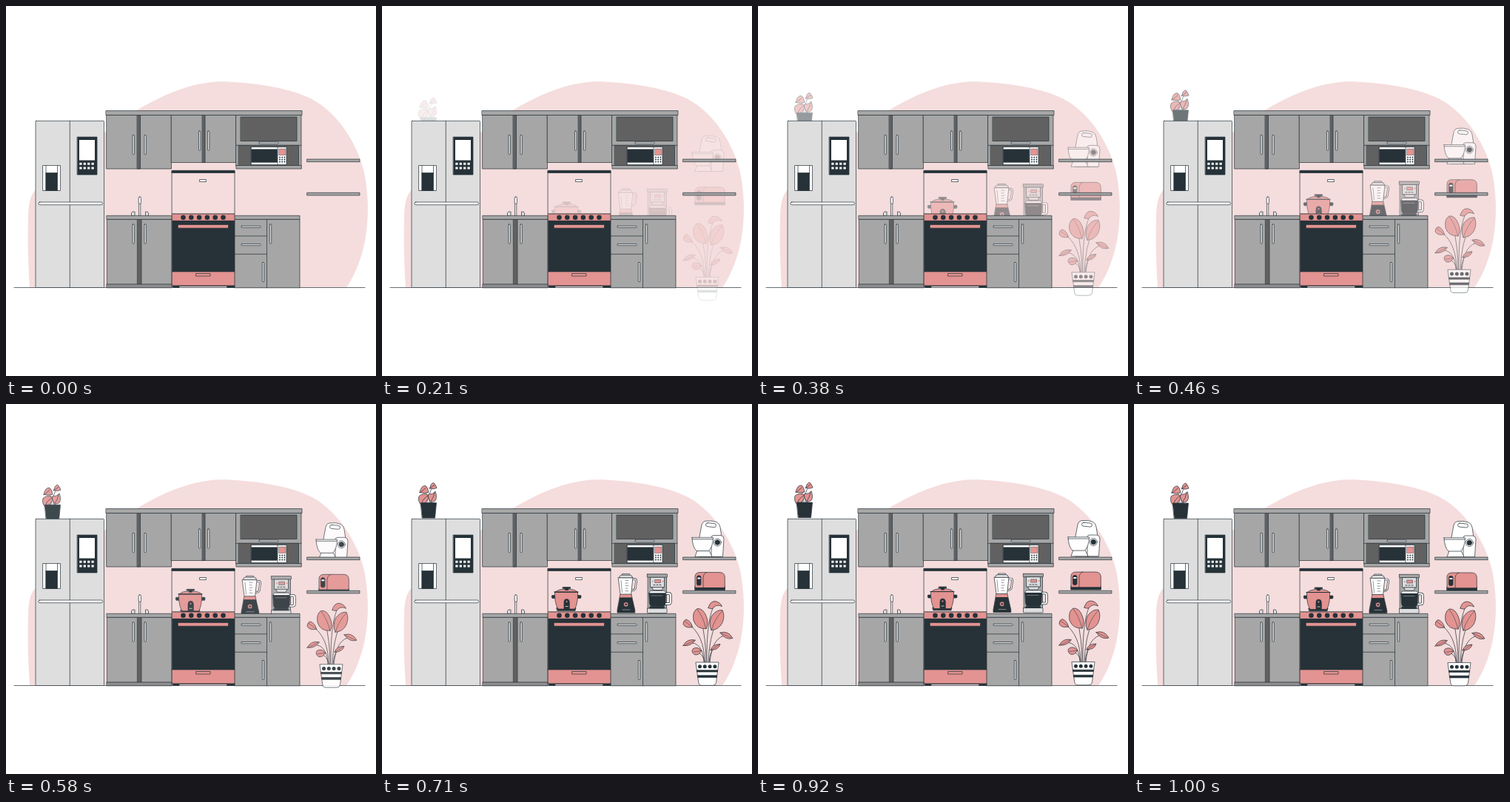
Write an HTML page that moves like this. It is 500 px wide and 500 px high and loops after 1040 ms.

```html
<!DOCTYPE html>
<html lang="en">
<head>
<meta charset="utf-8">
<title>Kitchen</title>
<style>
html, body { margin: 0; width: 100%; height: 100%; overflow: hidden; background: #fff; }
svg { display: block; width: 100%; height: 100%; }
.art { stroke: #263238; stroke-width: .7; stroke-linejoin: round; stroke-linecap: round; fill: none; }
.dark { fill: #263238; }
.gray { fill: #a6a6a6; }
.deep { fill: #616161; }
.pink { fill: #e39391; }
.pale { fill: #f5dddd; }
.white { fill: #fff; }
.light { fill: #dedede; }
.flat { stroke: none; }
.rise { opacity: 0; }
</style>
</head>
<body>
<svg viewBox="0 0 500 500">
<defs>
  <rect id="grip" class="light" width="2.4" height="26" rx=".6"/>
  <rect id="pull" class="light" width="26" height="2.2" rx=".6"/>
</defs>
<g class="art">
  <path class="pale flat" d="M32 380.5C30 350 29 320 30 285C30 268 33 254 41 248C70 228 110 183 175 142C210 121 250 102 295 102C340 104 380 111 405 122C445 138 475 185 484 225C495 280 488 340 460 380.5Z"/>
  <path d="M11 380.5H485"/>

  <!-- plant on the fridge -->
  <g class="rise">
    <path d="M61 134Q63 124 57 117M64 134Q62 121 69 112M60 134L54 129M66 134L69 126"/>
    <path class="pink" d="M51 120Q53 110 59 111Q62 113 63 120Q57 122 51 120Z"/>
    <path class="pink" d="M64.500 114.500Q66 107 70 107Q73 110 74 114Q70 116 64.500 114.500Z"/>
    <path class="pink" d="M53 137Q48 132 50 125Q56 120 63 124Q63 133 53 137Z"/>
    <path class="pink" d="M66 133Q61 127 63 122Q69 123 72 118.500Q75 127 72 131Q70 133 66 133Z"/>
    <path d="M53 137Q54 129 62 124.500M66 132Q70 127 71 120M52 120L59 114M65 114L71 110"/>
    <path class="dark" d="M52.500 134H73.500L71.500 154.500H54.500Z"/>
  </g>

  <!-- fridge -->
  <g>
    <rect class="light" x="40" y="155.300" width="92.500" height="225.200" rx=".8"/>
    <path d="M86.300 155.300V380.500"/>
    <rect class="white" x="44" y="265" width="86.500" height="3.700" rx="1.800"/>
    <rect class="white" x="50" y="215.500" width="23.500" height="34"/>
    <rect class="dark" x="54" y="225.500" width="15.500" height="24"/>
    <path d="M54 215.500V226M69.500 215.500V226"/>
    <rect class="dark" x="96.500" y="177" width="26.500" height="51"/>
    <rect class="white flat" x="99" y="181" width="21" height="27.500"/>
    <path d="M99.300 213.300H119.500M99.300 219H119.500" stroke="#fff" stroke-width="3" stroke-linecap="butt" stroke-dasharray="3.200 2.200"/>
  </g>

  <!-- upper cabinets -->
  <g>
    <rect class="gray" x="136" y="147.500" width="87.500" height="72.500"/>
    <rect class="deep" x="177.500" y="147.500" width="4" height="72.500"/>
    <use href="#grip" x="171" y="174.500"/>
    <use href="#grip" x="187" y="174.500"/>
    <rect class="gray" x="223.500" y="147.500" width="87.500" height="64"/>
    <rect class="deep" x="265.500" y="147.500" width="3.500" height="64"/>
    <use href="#grip" x="260.500" y="169"/>
    <use href="#grip" x="272.500" y="169"/>
    <rect class="gray" x="311" y="147.500" width="88" height="68.500"/>
    <rect class="deep" x="317.300" y="150" width="75.700" height="32.500"/>
    <path d="M311 188.300H399"/>
    <use href="#pull" x="342" y="184"/>
    <rect class="deep" x="314.500" y="188.300" width="81" height="27.500"/>
    <rect class="gray" x="311.300" y="215.500" width="88" height="4.500"/>
    <rect class="gray" x="135.300" y="141.500" width="264.700" height="6"/>
    <rect class="white" x="331.500" y="190.500" width="47.500" height="24"/>
    <rect class="dark" x="332" y="193.800" width="34.500" height="17.400"/>
    <path d="M367 190.500V214.500"/>
    <rect class="pink" x="368.800" y="193" width="9" height="8.500" stroke-width=".4"/>
    <path d="M370 204.500H377M370 207.500H377M370 210.500H377" stroke-width="1.900" stroke-dasharray="0 3.200"/>
  </g>

  <!-- tap -->
  <g class="white">
    <rect x="180" y="266" width="1.800" height="18"/>
    <rect x="179.200" y="258" width="3.200" height="9.300" rx="1.200"/>
    <path class="light" d="M169.500 283.500V279.500L171 278H174V283.500ZM192.500 283.500V279.500L191 278H188.500V283.500Z"/>
  </g>

  <!-- cooker back -->
  <rect class="pale" x="224.500" y="223" width="84.500" height="58"/>
  <rect class="dark" x="224.300" y="222.300" width="84.700" height="3.200"/>
  <rect class="white" x="262" y="234.500" width="8.500" height="3"/>

  <!-- rice pot -->
  <g class="rise">
    <path class="dark" d="M236 276H262L261 279.800H237Z"/>
    <path class="dark" d="M234 259H230.500Q229 259 229.300 261L230 263H235ZM264 259H268Q269.500 259 269 261L268.500 263H263Z"/>
    <path class="pink" d="M233.500 254.500H264.500Q265 270 260.500 277.500H238Q233 270 233.500 254.500Z"/>
    <path class="pink" d="M234.500 254.300Q238 250.500 249.300 250.500T264 254.300Z"/>
    <path d="M233 254.500H265" stroke-width="1.200"/>
    <path class="dark" d="M244.500 248H254.500V249.800H252L251.500 252H247.500L247 249.800H244.500Z"/>
    <path class="dark" d="M246 277.500V268Q246 264 249.500 264T253.300 268V277.500Z"/>
    <circle class="pink" cx="249.600" cy="267.500" r="1.400"/>
    <path d="M248 274H251.200" stroke="#fff"/>
  </g>

  <!-- blender -->
  <g class="rise">
    <path d="M338 237H341.500Q343.800 237 343.500 240L342.500 249Q342 252 336.500 253" stroke-width="2.600"/>
    <path d="M338 237H341.500Q343.800 237 343.500 240L342.500 249Q342 252 336.500 253" stroke="#fff" stroke-width="1.300"/>
    <path class="white" d="M319.500 235H339L336.500 258H322.500Z"/>
    <path class="light" d="M320.500 235Q321 231.500 324 231.500H335Q338 231.500 338.500 235Z"/>
    <path class="white" d="M325 230H334.500V231.500H325Z"/>
    <path d="M323 239L324.500 255M329 239H333M329 242.500H332M329 246H333M329 249.500H332M329 253H333" stroke-width=".5"/>
    <path class="pink" d="M322.300 257.500H337L338 262.500H321.300Z"/>
    <path class="dark" d="M321.300 262.500H338L341.800 279V282.500H318V279Z"/>
    <circle class="pink" cx="329.800" cy="271.300" r="3.200"/>
    <circle class="dark" cx="329.800" cy="271.300" r="1"/>
    <path d="M325 278.500H335" stroke="#a6a6a6"/>
  </g>

  <!-- coffee machine -->
  <g class="rise">
    <rect class="gray" x="359.500" y="233" width="25" height="45"/>
    <rect class="light" x="363" y="234.500" width="18.500" height="13.500"/>
    <rect class="gray" x="358.300" y="230.300" width="27.200" height="4.300" rx=".6"/>
    <rect class="pink" x="369" y="238" width="7.500" height="4" stroke-width=".5"/>
    <path d="M366 240H380" stroke="#e39391" stroke-width="2.200" stroke-dasharray="0 13.500"/>
    <path d="M367 245H378" stroke-width=".9" stroke-dasharray="2 2"/>
    <path class="light" d="M365 248H380L378 252H367Z"/>
    <path d="M383 256.500H387.500Q390 256.500 390 259V268Q390 270.500 387.500 270.500H382.500" stroke-width="3.400"/>
    <path d="M383 256.500H387.500Q390 256.500 390 259V268Q390 270.500 387.500 270.500H382.500" stroke="#fff" stroke-width="2"/>
    <path class="dark" d="M361 256H383.500L383 270Q382 273.800 379 274H365.500Q362 273.800 361.500 270Z"/>
    <path class="white" d="M361 256L362.500 253H382L384 256Z"/>
    <path d="M364 259.500H379" stroke="#a6a6a6" stroke-width=".6"/>
    <rect class="light" x="358.500" y="276.500" width="26.500" height="6.500" rx=".6"/>
    <rect class="dark" x="362" y="274.300" width="19.500" height="2.200"/>
  </g>

  <!-- lower cabinets -->
  <g>
    <rect class="gray" x="136.800" y="288.300" width="87.400" height="88"/>
    <rect class="deep" x="177.800" y="288.300" width="5.200" height="88"/>
    <rect x="136.300" y="376" width="88" height="4.800" fill="#8e8e8e"/>
    <rect class="gray" x="136.300" y="283.300" width="88" height="5"/>
    <use href="#grip" x="171" y="295"/>
    <use href="#grip" x="187" y="295"/>
    <rect class="gray" x="309" y="288.300" width="88" height="92.500"/>
    <path d="M352.500 288.300V380.800M309 310.800H352.500M309 335.300H352.500"/>
    <rect class="gray" x="309" y="283.300" width="88" height="5"/>
    <use href="#pull" x="318" y="297.300"/>
    <use href="#pull" x="318" y="321.500"/>
    <use href="#grip" x="346.300" y="346.500"/>
    <use href="#grip" x="356.300" y="295"/>
  </g>

  <!-- cooker front -->
  <g>
    <path class="dark" d="M226 378H234V380.500H226ZM299 378H309V380.500H299Z"/>
    <rect class="pink" x="224.500" y="281" width="84.500" height="9.500"/>
    <path d="M239.500 285.700H294" stroke-width="6.600" stroke-dasharray="0 10.800"/>
    <rect class="dark" x="224.500" y="290.300" width="84.500" height="69"/>
    <rect class="pink" x="232.500" y="295.500" width="68" height="4.700"/>
    <rect class="pink" x="224.500" y="359" width="84.500" height="19"/>
    <rect class="pink" x="257" y="361.500" width="19" height="3.500"/>
    <path d="M224.500 378.300H309" stroke-width="1"/>
  </g>

  <!-- stand mixer -->
  <g class="rise">
    <path class="white" d="M429 206.500V180L432 164Q433 159 438 158.500Q446 157.500 452 160Q456.500 162 457 167L459 180V206.500Z"/>
    <rect class="white" x="437.500" y="161.500" width="14" height="5" rx="2.500" transform="rotate(6 444 164)"/>
    <path class="white" d="M445 206.500V181Q445 178 448 178H458Q462 178.500 462 183L460.500 206.500Z"/>
    <circle class="white" cx="453.300" cy="187.500" r="5"/>
    <circle class="dark" cx="453.300" cy="187.500" r="3.300"/>
    <path class="white" d="M423 206.500L426 198.500H442L446 206.500Z"/>
    <path class="white" d="M419 180.800H447.500Q447 194 441.500 199H425Q419.500 194 419 180.800Z"/>
    <path d="M419.200 183H447"/>
  </g>

  <!-- toaster -->
  <g class="rise">
    <rect class="dark" x="423" y="247" width="40.500" height="5"/>
    <path class="pink" d="M423 248.500V234Q423 228.500 429 228H457Q463.300 228.500 463.300 235V248.500Z"/>
    <path d="M434 248.500V235Q434.500 229 439 228"/>
    <rect class="dark" x="425.500" y="232.500" width="5.500" height="13" rx="2"/>
    <rect class="white flat" x="426.300" y="235" width="4" height="2" rx=".6"/>
  </g>

  <!-- shelves -->
  <g class="gray">
    <rect x="407" y="207" width="71" height="3.600"/>
    <rect x="407" y="252.300" width="71" height="3.600"/>
  </g>

  <!-- floor plant -->
  <g class="rise">
    <path d="M438 350Q438 318 431 291M441 350Q442 315 453 292M439 350Q438 290 450 270M436 350Q436 312 413 297M443 350Q446 314 466 313M435 350Q434 322 415 323M437 350Q434 338 425 335M442 350Q443 334 450 329"/>
    <g class="pink">
      <path d="M441 276Q443 267 450 267Q457 268 459.500 274Q453 271 449 274.500Q447 279 441 276Z"/>
      <path d="M438 304Q425 305 421 293Q419 281 426 277Q434 276 438.500 288Q442 298 438 304Z"/>
      <path d="M445 306Q441 297 445.500 287Q452 278 460 279Q464 287 459.500 297Q454 306 445 306Z"/>
      <path d="M419.500 302Q410 304 407 298Q407 293 411 291.500Q418 294 419.500 302Z"/>
      <path d="M457 309.500Q468 306 474 317Q464 320 457 309.500Z"/>
      <path d="M407 327Q412 317 423.500 319.500Q418 328 407 327Z"/>
      <path d="M431.500 334Q428 341 422 339Q417 335 420.500 331Q427 327.500 431.500 334Z"/>
      <path d="M444 333Q446 325 457 325Q455 333 444 333Z"/>
    </g>
    <path d="M437.500 303Q434 288 426 278M445.500 305Q450 290 460 280M419 301.500L409 294M458 310L472 316.500M409 326.500L422 320M431 334L421 335.500M445 332.500L456 325.500" stroke-width=".5"/>
    <path class="white" d="M424.300 349.500H455L451.500 377Q451 380.800 447 380.800H432Q428.300 380.800 427.800 377Z"/>
    <path d="M429.500 355.300H451" stroke-width="5" stroke-dasharray="0 6.800"/>
    <path class="dark" d="M425.700 360.200H453.600L453.300 362.500H426ZM426.600 367.300H452.700L452.400 370H426.900Z"/>
  </g>
</g>
</svg>
<script>
const LOOP = 1040, FPS = 24, DROP = 20;
const items = document.querySelectorAll('.rise');

const curve = (a, b, u) => 3 * (1 - u) * (1 - u) * u * a + 3 * (1 - u) * u * u * b + u * u * u;

// cubic-bezier(.36, -.01, .5, 1.38): ends with a slight overshoot
function ease(x) {
  let lo = 0, hi = 1;
  for (let i = 0; i < 30; i++) {
    const mid = (lo + hi) / 2;
    if (curve(.36, .5, mid) < x) lo = mid; else hi = mid;
  }
  return curve(-.01, 1.38, lo);
}

function draw(now) {
  const step = Math.min(FPS, Math.floor((now % LOOP + 5) * FPS / 1000));
  const p = ease(step / FPS);
  const alpha = step < 3 ? 0 : Math.min(1, p);
  for (const el of items) {
    el.style.opacity = alpha;
    el.setAttribute('transform', `translate(0 ${(DROP * (1 - p)).toFixed(3)})`);
  }
}

const start = performance.now();
function tick() {
  draw(performance.now() - start);
  requestAnimationFrame(tick);
}
tick();
</script>
</body>
</html>
```
